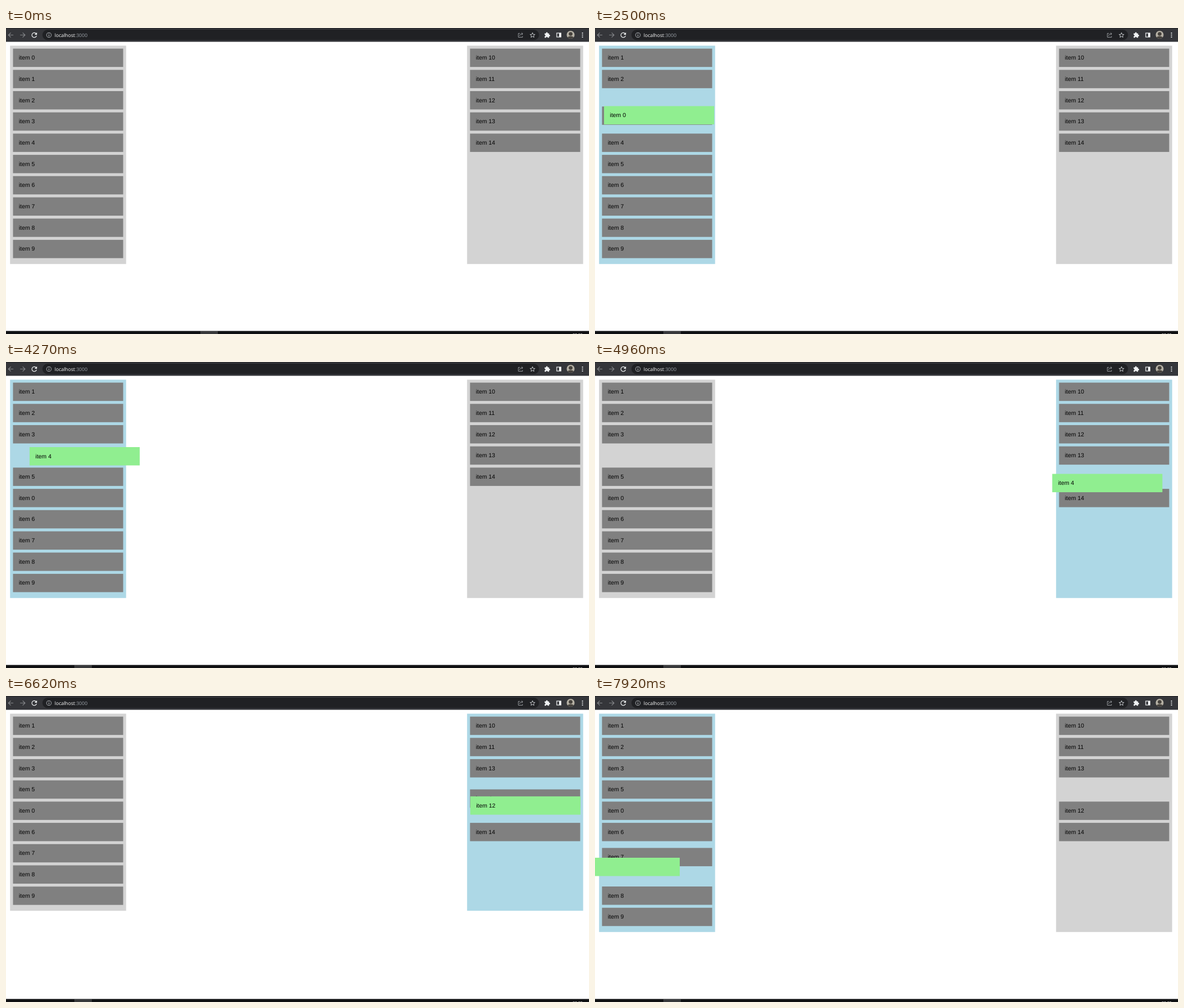
These frames come from a looping animation (1032x543 px, 7.99 s). An HTML page:

```html
<!DOCTYPE html>
<html lang="en">
<head>
<meta charset="utf-8">
<title>Drag and drop lists</title>
<style>
  html, body { margin: 0; width: 100%; height: 100%; overflow: hidden; background: #fff; }
  svg { display: block; width: 100%; height: 100%; }
  text { text-rendering: geometricPrecision; }
  .item text { font: 10.4px "Liberation Sans", Arial, sans-serif; }
  .url { font: 8.65px "Open Sans", "Noto Sans", sans-serif; fill: #fff; }
  .clock { font: 7px "Open Sans", "Noto Sans", sans-serif; fill: #fff; }
  .line { fill: none; stroke-width: 1.2; }
  .thin { fill: none; stroke-width: .9; }
</style>
</head>
<body>
<svg id="stage" viewBox="0 0 1032 543">
  <rect width="1032" height="543" fill="#fff"/>

  <g id="toolbar">
    <rect width="1032" height="24.5" fill="#35363a"/>
    <rect width="1032" height="1" fill="#202124"/>
    <rect x="64.5" y="3" width="879" height="18.5" rx="9.25" fill="#202124"/>
    <path class="line" stroke="#85878a" d="M13 12.5H4.5M8.5 8.3L4.3 12.5L8.5 16.7M25 12.5H33.5M29.5 8.3L33.7 12.5L29.5 16.7"/>
    <path class="line" stroke="#f1f3f4" d="M53.4 10A4.2 4.2 0 1 0 54.1 13.6"/>
    <path fill="#f1f3f4" d="M54.8 7.8V12H50.6Z"/>
    <circle class="thin" cx="76" cy="12.5" r="4.1" stroke="#bdc1c6"/>
    <path class="line" stroke="#bdc1c6" d="M76 12V14.8M76 10V11.1"/>
    <text class="url" x="86" y="15.7">localhost<tspan fill="#9aa0a6">:3000</tspan></text>
    <path class="thin" stroke="#a9acb0" d="M909.5 9.5H907V16.4H914.3V14.4M909.3 13.8C909.6 11.2 911 10.3 914.6 10.3M912.6 8.2L914.8 10.3L912.6 12.4"/>
    <path class="thin" id="star" stroke="#d0d3d6"/>
    <path fill="#f1f3f4" d="M953.5 9.6H956V9A1.4 1.4 0 0 1 958.8 9V9.6H961.3V12H961.8A1.4 1.4 0 0 1 961.8 14.8H961.3V17.2H958.8A1.4 1.4 0 0 0 956 17.2H953.5V14.8A1.4 1.4 0 0 0 953.5 12Z"/>
    <rect class="line" x="974.9" y="9" width="7.4" height="7" stroke="#f1f3f4"/>
    <rect x="979" y="9" width="3.5" height="7" fill="#f1f3f4"/>
    <clipPath id="round"><circle cx="999.5" cy="12" r="7"/></clipPath>
    <g clip-path="url(#round)">
      <rect x="992" y="4" width="15" height="16" fill="#b5b0a4"/>
      <circle cx="999.5" cy="10.5" r="3.3" fill="#45413c"/>
      <ellipse cx="999.5" cy="19" rx="6.4" ry="4.5" fill="#45413c"/>
    </g>
    <g fill="#f1f3f4">
      <circle cx="1020.5" cy="9" r="1.1"/><circle cx="1020.5" cy="12.5" r="1.1"/><circle cx="1020.5" cy="16" r="1.1"/>
    </g>
  </g>

  <g id="lists"></g>

  <g id="taskbar">
    <rect y="537.6" width="1032" height="6" fill="#101113"/>
    <rect id="tab" y="538" width="31" height="5" fill="#38393b"/>
    <text class="clock" x="1003" y="546.5">22:05</text>
  </g>
</svg>

<script>
const LOOP = 7990, REPAINT = 68.4, DROP = 335, SHIFT = 200, TAB_SWITCH = 1180;
const PITCH = 37.7, TOP = 36.6, PAD = 5.2, ITEM_W = 195, ITEM_H = 32.5;
const COL_X = [12.4, 821.4];

// Pointer key points: time, x, y of the held item
const DRAGS = [
  { item: 0, end: 3660, keys: [[1480, 16, 40], [1620, 47, 62], [1820, 27, 73.5], [2220, 18, 92], [3190, 14.5, 234.5]] },
  { item: 4, end: 5590, keys: [[4200, 14, 150], [4700, 725, 180], [4950, 809, 198.5], [5250, 814, 195]] },
  { item: 12, end: 7250, keys: [[6130, 821.4, 117.8], [6800, 822, 193]] },
  { item: 4, end: 8400, keys: [[7520, 815, 151], [7653, 520, 222], [7740, 135, 255], [7930, -45, 287]] }
];

const clamp = v => Math.max(0, Math.min(1, v));
const mix = (a, b, k) => a + (b - a) * k;
const rowY = row => TOP + row * PITCH;
const hovered = x => COL_X.findIndex(cx => Math.abs(x - cx) < 100);

function bezier(x1, y1, x2, y2) {
  const at = (a, b, s) => 3 * (1 - s) ** 2 * s * a + 3 * (1 - s) * s * s * b + s ** 3;
  return x => {
    let lo = 0, hi = 1;
    for (let i = 0; i < 24; i++) {
      const mid = (lo + hi) / 2;
      if (at(x1, x2, mid) < x) lo = mid; else hi = mid;
    }
    return x <= 0 ? 0 : x >= 1 ? 1 : at(y1, y2, lo);
  };
}
const slideEase = bezier(.2, 0, 0, 1);
const dropEase = bezier(.2, 1, .1, 1);

// Smooth curve through the key points, at rest at both ends
function along(keys, t) {
  const last = keys.length - 1;
  const i = Math.max(0, Math.min(last - 1, keys.findLastIndex(k => k[0] <= t)));
  const a = keys[i], b = keys[i + 1], span = b[0] - a[0], s = clamp((t - a[0]) / span);
  const slope = (j, axis) => j === 0 || j === last ? 0 :
    (keys[j + 1][axis] - keys[j - 1][axis]) / (keys[j + 1][0] - keys[j - 1][0]);
  return [1, 2].map(axis =>
    mix(a[axis], b[axis], s * s * (3 - 2 * s)) +
    span * s * (1 - s) * (slope(i, axis) * (1 - s) - slope(i + 1, axis) * s));
}

// Rows by which a resting item makes way for the held one
function makeWay(scene, col, row, [x, y]) {
  if (hovered(x) !== col) return 0;
  const middle = rowY(row) + ITEM_H / 2;
  if (col === scene.home) return row > scene.row && middle < y + ITEM_H ? -1 : 0;
  return middle > y ? 1 : 0;
}

// Play one drag through: note every slide, the landing place and the new order
function rehearse(drag, order) {
  const { item, keys, end } = drag, start = keys[0][0], drop = end - DROP;
  const home = order.findIndex(list => list.includes(item));
  const scene = { ...drag, start, drop, order, home, row: order[home].indexOf(item), slides: [] };
  const shifts = {};
  for (let t = start; t < drop; t += 4) {
    const point = along(keys, t);
    order.forEach((list, col) => list.forEach((other, row) => {
      const shift = other === item ? 0 : makeWay(scene, col, row, point);
      if (shift !== (shifts[other] || 0)) scene.slides.push({ time: t, item: other, shift });
      shifts[other] = shift;
    }));
  }
  scene.col = hovered(along(keys, drop)[0]);
  const moved = order[scene.col].filter(other => shifts[other]).length;
  scene.to = scene.col === home ? scene.row + moved : order[scene.col].length - moved;
  scene.next = order.map(list => list.filter(other => other !== item));
  scene.next[scene.col].splice(scene.to, 0, item);
  return scene;
}

const range = (from, to) => Array.from({ length: to - from }, (_, i) => from + i);
const firstOrder = [range(0, 10), range(10, 15)];
const scenes = [];
for (const drag of DRAGS) scenes.push(rehearse(drag, scenes.length ? scenes.at(-1).next : firstOrder));

function shiftAt(scene, item, t) {
  let from = 0, to = 0, start = 0;
  const value = time => mix(from, to, slideEase(clamp((time - start) / SHIFT)));
  for (const slide of scene.slides) {
    if (slide.item !== item || slide.time > t) continue;
    from = value(slide.time);
    to = slide.shift;
    start = slide.time;
  }
  return value(t);
}

const byId = id => document.getElementById(id);
function add(parent, tag, attrs) {
  const el = parent.appendChild(document.createElementNS("http://www.w3.org/2000/svg", tag));
  for (const key in attrs) el.setAttribute(key, attrs[key]);
  return el;
}

const lists = byId("lists");
const columns = COL_X.map(x => add(lists, "rect", { x: x - PAD, y: TOP - PAD, width: ITEM_W + 2 * PAD }));
const items = range(0, 15).map(i => {
  const group = add(lists, "g", { class: "item" });
  const box = add(group, "rect", { width: ITEM_W, height: ITEM_H });
  add(group, "text", { x: 10.4, y: 19.6 }).textContent = "item " + i;
  return { group, box };
});

byId("star").setAttribute("d", "M" + range(0, 10).map(i => {
  const r = i % 2 ? 2 : 4.6, a = Math.PI * (i / 5 - .5);
  return (932 + r * Math.cos(a)).toFixed(2) + " " + (12.9 + r * Math.sin(a)).toFixed(2);
}).join("L") + "Z");

function put(item, x, y, color) {
  const { group, box } = items[item];
  group.setAttribute("transform", `translate(${x.toFixed(2)} ${y.toFixed(2)})`);
  box.setAttribute("fill", color);
}

function draw(now) {
  const scene = scenes.findLast(s => s.start <= now);
  const held = scene && now < scene.end ? scene : null;
  const order = held ? held.order : scene ? scene.next : firstOrder;
  const t = held ? held.start + Math.floor((now - held.start) / REPAINT + .35) * REPAINT : now;
  const point = held && along(held.keys, t);
  const over = held ? hovered(point[0]) : -1;

  const rows = Math.max(...order.map((list, col) =>
    list.length + (col === over && col !== held.home ? 1 : 0)));
  columns.forEach((rect, col) => {
    rect.setAttribute("height", rows * PITCH + 2 * PAD);
    rect.setAttribute("fill", col === over ? "#add8e6" : "#d3d3d3");
  });

  order.forEach((list, col) => list.forEach((item, row) => {
    const shift = held ? shiftAt(held, item, t) : 0;
    put(item, COL_X[col], rowY(row + shift), "#808080");
  }));
  if (held) {
    const k = dropEase(clamp((t - held.drop) / DROP));
    put(held.item, mix(point[0], COL_X[held.col], k), mix(point[1], rowY(held.to), k), "#90ee90");
    lists.appendChild(items[held.item].group);
  }
  byId("tab").setAttribute("x", now < TAB_SWITCH ? 344 : 121);
}

const began = performance.now();
function tick() {
  draw((performance.now() - began) % LOOP);
  requestAnimationFrame(tick);
}
tick();
</script>
</body>
</html>
```
